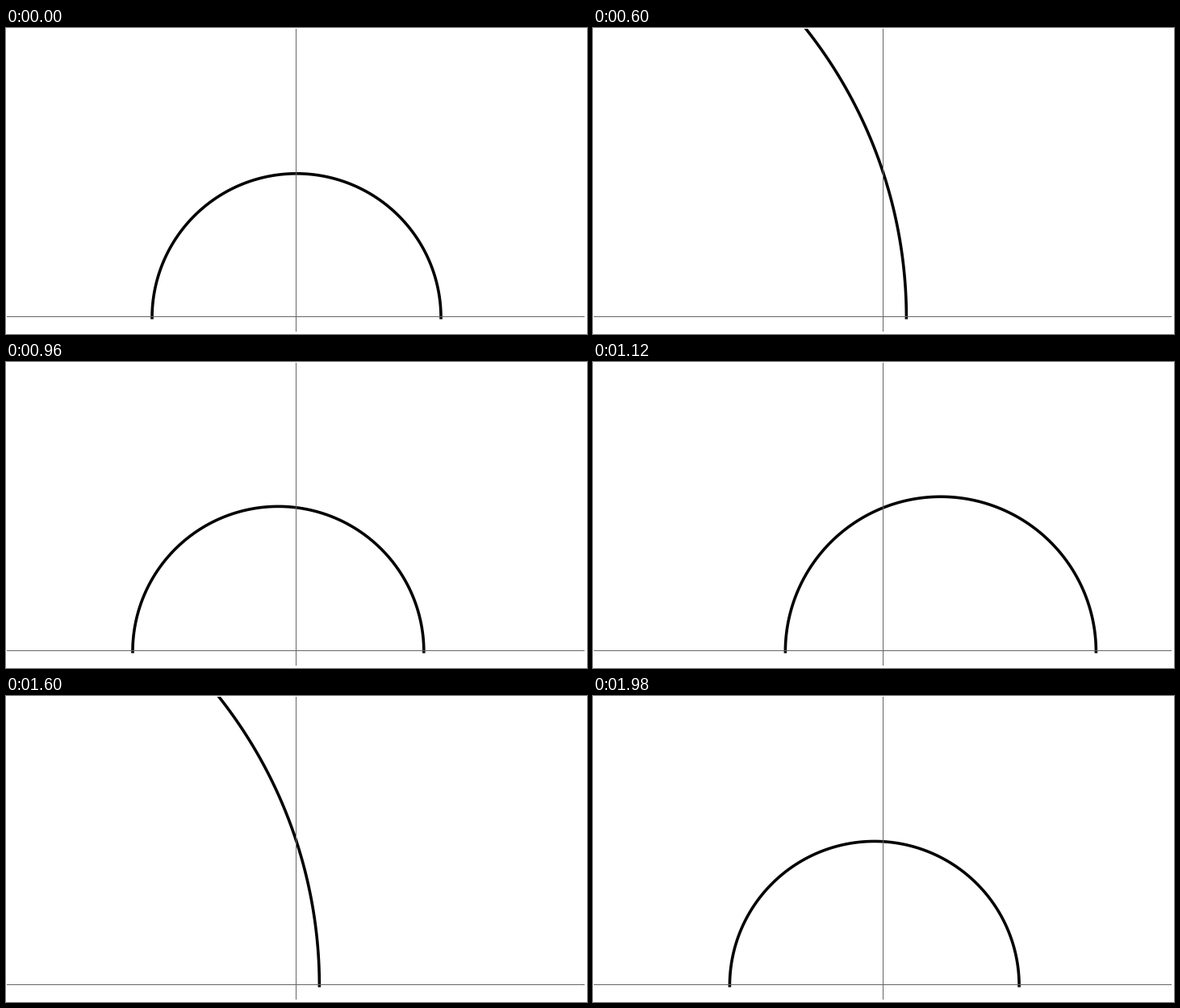
A matplotlib script for the animation above (2000 ms loop, 720x380 px).

```python
import numpy as np
import matplotlib.pyplot as plt
from matplotlib.animation import FuncAnimation
from matplotlib.patches import Rectangle

plt.rcParams["path.simplify"] = False

W, H, DPI = 720, 380, 100
FRAMES, INTERVAL = 100, 20
CX, CY, UNIT = 360, 359.8, 179      # half-plane origin and scale in pixels
GREY = "#666666"

fig = plt.figure(figsize=(W / DPI, H / DPI), dpi=DPI, facecolor="white")
ax = fig.add_axes([0, 0, 1, 1])
ax.set_xlim(0, W)
ax.set_ylim(H, 0)
ax.axis("off")

curve, = ax.plot([], [], color="black", lw=3.6 * 72 / DPI, snap=False,
                 solid_capstyle="projecting", solid_joinstyle="round")
curve.set_clip_path(Rectangle((1, 1), 716, 376, transform=ax.transData))

# Axes lie on top of the curve
for x, y, w, h in ((1, 358, 716, 1), (359, 1, 1, 376)):
    ax.add_patch(Rectangle((x, y), w, h, fc=GREY, lw=0, zorder=3))

ray = 1j * np.exp(np.linspace(-9, 9, 1201))


def geodesic(turn):
    """Geodesic through i whose Euclidean centre is tan(turn)."""
    phi = (turn + np.pi / 2) / 2
    c, s = np.cos(phi), np.sin(phi)
    return (c * ray + s) / (c - s * ray)


def update(i):
    z = geodesic(2 * np.pi * i / FRAMES)
    curve.set_data(CX + UNIT * z.real, CY - UNIT * z.imag)
    return curve,


anim = FuncAnimation(fig, update, frames=FRAMES, interval=INTERVAL,
                     repeat=True, repeat_delay=0)
plt.show()
```
